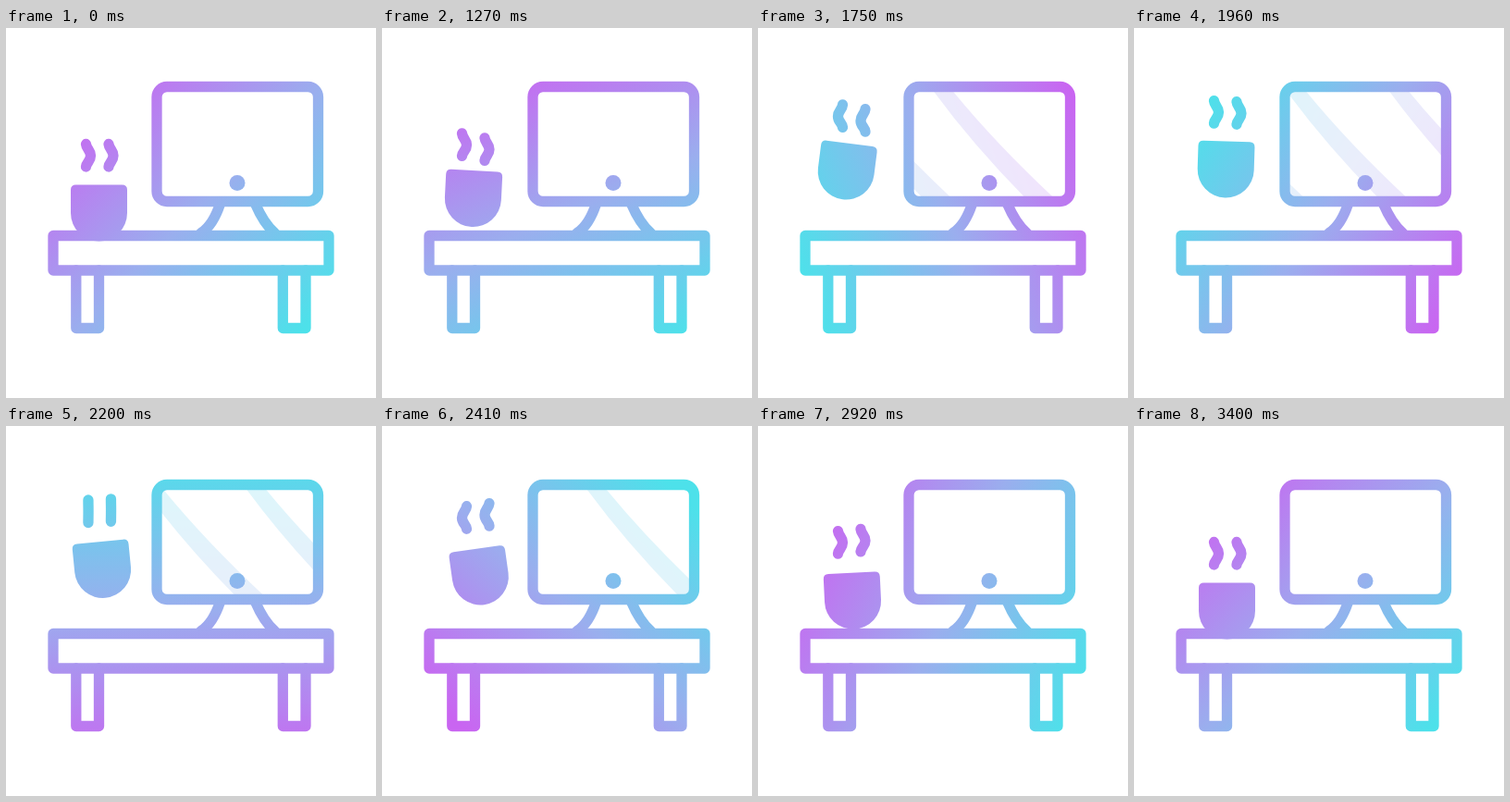
An HTML page without scripts for the animation above (3.43 s loop, 400 px wide and 400 px high).

```html
<!DOCTYPE html>
<html lang="en">
<head>
<meta charset="utf-8">
<title>Desk with floating cup</title>
<style>
  /* One eased phase drives every part; --lag bends it so parts trail each other. */
  @property --phase { syntax: "<number>"; inherits: true; initial-value: 0; }
  @keyframes run {
    0% { --phase: 0; }
    29.15% { --phase: 0; animation-timing-function: cubic-bezier(.3, .1, .5, 1); }
    99.13%, 100% { --phase: 1; }
  }
  html, body { margin: 0; width: 100%; height: 100%; overflow: hidden; background: #fff; }
  svg { display: block; width: 100%; height: 100%; --lag: 1.1; animation: run 3.43s linear infinite; }
  svg * { --p: pow(var(--phase), var(--lag)); }

  .line { fill: none; stroke: #fff; stroke-width: 11.3px; stroke-linecap: round; stroke-linejoin: round; }
  .solid { fill: #fff; }

  .tint { transform-origin: 204px 199px; transform: rotate(calc(45deg + 360deg * var(--p))); }
  .glare { opacity: .21; transform: translateX(calc(-190px + 595px * var(--p))); }
  .float {
    --side: calc(2 * var(--p) - 1);
    transform: translateY(calc(-47px * (1 - pow(max(var(--side), -1 * var(--side)), 2.4))));
  }
  .tilt { transform-origin: 100.5px 158px; transform: rotate(calc(8deg * sin(360deg * var(--p)))); }
  .wisp {
    vector-effect: non-scaling-stroke;
    transform-origin: 89px 0;
    transform: scaleX(clamp(-1, 2.5 * cos(720deg * var(--p)), 1));
  }
  .cup { --lag: 1; }
  .near { --lag: 1.12; }
  .far { --lag: 1.35; }
  .tilt, .wisp { --lag: 1.1; }
</style>
</head>
<body>
<svg viewBox="0 0 400 400">
  <defs>
    <linearGradient id="sweep" gradientUnits="userSpaceOnUse" x1="32" y1="0" x2="376" y2="0">
      <stop offset="0" stop-color="#c965f1"/>
      <stop offset=".5" stop-color="#9aaeee"/>
      <stop offset="1" stop-color="#4de1ea"/>
    </linearGradient>
    <clipPath id="screen"><rect x="168" y="69" width="164" height="113.5"/></clipPath>
    <path id="band" d="M190 69Q232 126 288 183H319Q257 125 211 69Z"/>
    <path id="wisp" class="line wisp" d="M86.5 125.5C87 131 91.5 132 91.5 138S87 145 86.5 150"/>

    <!-- White shapes reveal the rotating gradient -->
    <mask id="icon" maskUnits="userSpaceOnUse" x="0" y="0" width="400" height="400">
      <g class="line">
        <rect x="163" y="63.5" width="174.5" height="124" rx="11"/>
        <path d="M231.5 190Q224 213 211 221.500M269.500 190Q279 212 290.500 221.500"/>
        <rect x="51" y="224.5" width="298" height="37.5"/>
        <path id="leg" d="M75.800 262V324.500H100.500V262"/>
        <use href="#leg" x="223.5"/>
      </g>
      <circle class="solid" cx="250" cy="167.5" r="8.5"/>

      <g clip-path="url(#screen)">
        <g class="solid glare">
          <use href="#band"/>
          <use href="#band" x="-111"/>
          <use href="#band" x="-222"/>
        </g>
      </g>

      <g class="float near"><use href="#wisp"/></g>
      <g class="float far"><use href="#wisp" x="24.5"/></g>
      <g class="float cup">
        <path class="solid tilt" d="M75.500 169.500H125.500Q131 169.500 131 175V200A30.500 30.500 0 0 1 70 200V175Q70 169.500 75.500 169.500Z"/>
      </g>
    </mask>
  </defs>

  <g mask="url(#icon)">
    <rect class="tint" x="-200" y="-200" width="800" height="800" fill="url(#sweep)"/>
  </g>
</svg>
</body>
</html>
```
